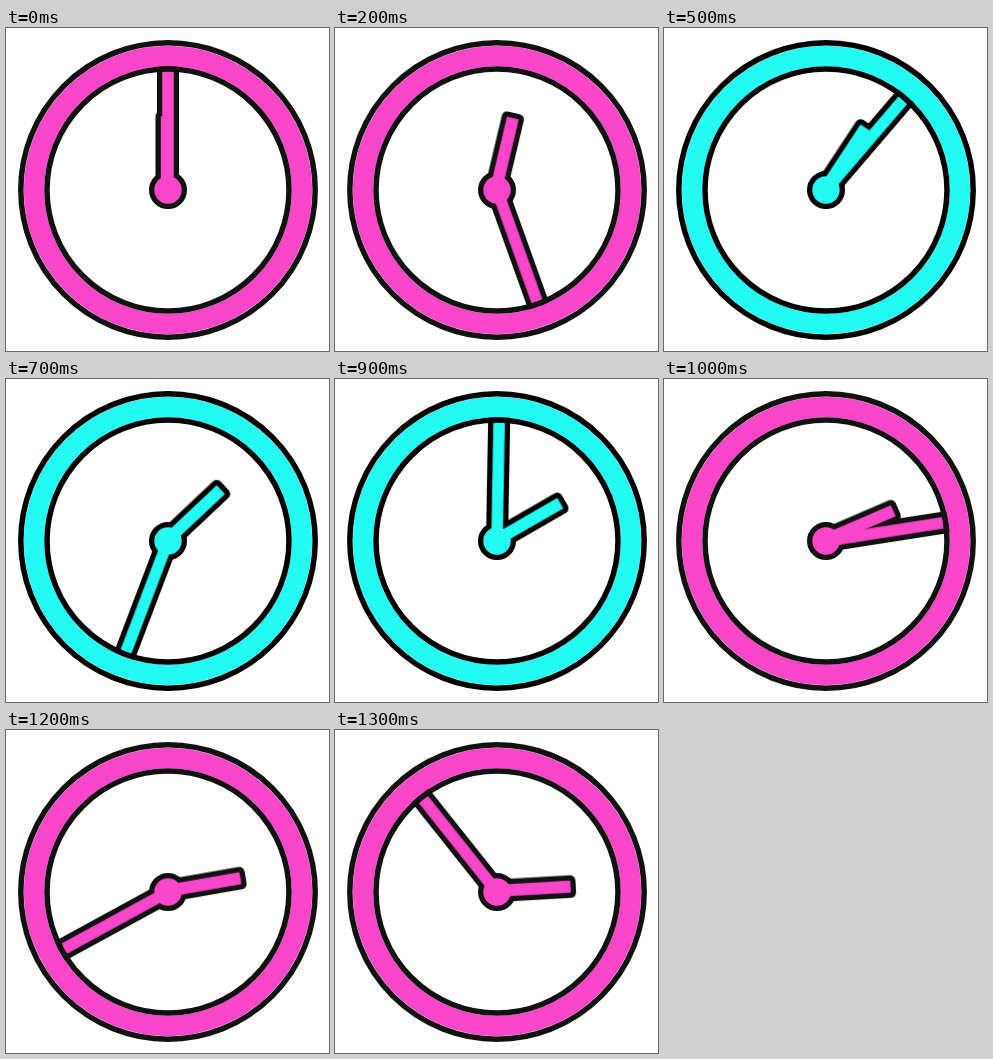
An HTML page for the animation above (1400 ms loop, 323 by 323 pixels).

```html
<!DOCTYPE html>
<html lang="en">
<head>
<meta charset="utf-8">
<title>Clock</title>
<style>
  html, body { margin: 0; width: 100%; height: 100%; overflow: hidden; background: #fff; }
  svg { display: block; width: 100vw; height: 100vh; animation: tint 1400ms step-end infinite; }
  .line { fill: none; stroke: var(--ink); stroke-width: 5.5; }
  .band { fill: none; stroke: var(--tint); stroke-width: 20.5; }
  .edge { fill: var(--ink); stroke: var(--ink); stroke-width: 10.6; stroke-linejoin: round; }
  .face { fill: var(--tint); }
  .hour, .minute { transform-origin: 0 0; animation: 1400ms steps(14, end) infinite; }
  .hour { animation-name: hour; }
  .minute { animation-name: minute; }

  /* 14 ticks per loop, a little over 80 degrees each */
  @keyframes minute { from { transform: rotate(0deg); } to { transform: rotate(1121.6deg); } }
  @keyframes hour { from { transform: rotate(0deg); } to { transform: rotate(93.4deg); } }
  @keyframes tint {
    0%, 71.428% { --tint: #fa46c8; --ink: #111; }
    35.714% { --tint: #24fbf2; --ink: #000; }
    100% { --tint: #fa46c8; --ink: #111; }
  }
</style>
</head>
<body>
<svg viewBox="-162 -162 323 323">
  <g class="edge">
    <rect class="hour" x="-7.2" y="-73.7" width="12" height="73.7"/>
    <rect class="minute" x="-5.75" y="-121" width="11.5" height="121"/>
    <circle r="13.7"/>
  </g>
  <g class="face">
    <rect class="hour" x="-7.2" y="-73.7" width="12" height="73.7"/>
    <rect class="minute" x="-5.75" y="-121" width="11.5" height="121"/>
    <circle r="13.7"/>
  </g>
  <circle class="band" r="134"/>
  <circle class="line" r="147.2"/>
  <circle class="line" r="121"/>
</svg>
</body>
</html>
```
